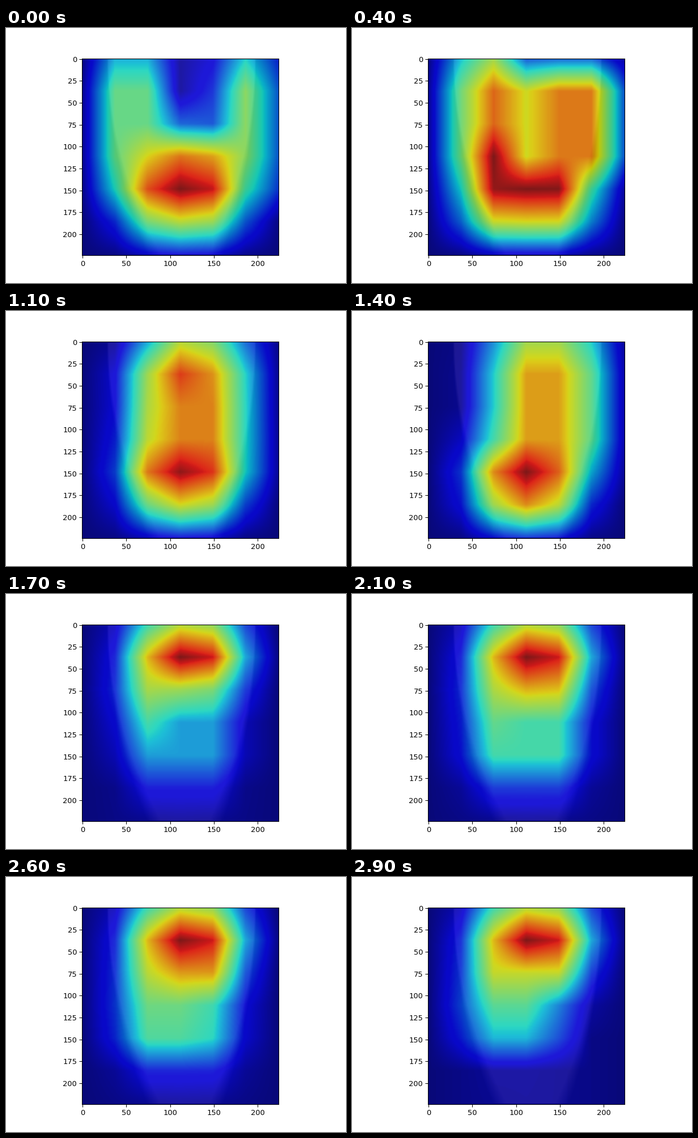
A matplotlib script that plays this animation: 600 px wide and 450 px high, repeating every 3 s.

```python
import numpy as np
import matplotlib.pyplot as plt
from matplotlib.animation import FuncAnimation

SIZE = 224
NODES = 7
FRAMES = 30
INTERVAL = 100

ROW, COL = np.mgrid[:NODES, :NODES]
HAZE = 0.02 + 0.03 * np.sin(np.pi * COL / (NODES - 1))


def blob(cols, rows, peak, reach):
    """Flat patch over a span of mesh columns and rows, with a soft rim."""
    dx = COL - np.clip(COL, *cols)
    dy = ROW - np.clip(ROW, *rows)
    return peak * np.exp(-(dx**2 + dy**2) / reach**2)


def pose(*blobs):
    return np.maximum.reduce([HAZE, *blobs])


UPPER_SPOT = blob((2.8, 3.6), (0.95, 1), 1, 1.3)

# Activation on the coarse mesh at its key frames.
POSES = {
    0: pose(blob((1, 2), (0.4, 3.7), 0.47, 0.65),
            blob((4.7, 5.4), (0.4, 3.7), 0.53, 0.65),
            blob((2.6, 3.6), (3.7, 4), 1, 1.4)),
    4: pose(blob((1.7, 2), (0.6, 3.2), 0.8, 1),
            blob((2, 2), (3, 3.5), 1, 0.7),
            blob((2.2, 3.9), (4, 4.2), 1, 1.2),
            blob((3.4, 5), (1, 3), 0.77, 0.9)),
    8: pose(blob((2, 4.15), (1.2, 4.1), 0.8, 0.85),
            blob((3, 3.3), (0.9, 1), 1, 1.3),
            blob((2.7, 3.8), (4, 4), 0.96, 1.3)),
    14: pose(blob((3, 4.2), (0.6, 3.3), 0.72, 1.2),
             blob((2.7, 3.4), (4, 4.3), 1, 1.3)),
    17: pose(UPPER_SPOT,
             blob((2, 2.3), (1.5, 2.5), 0.57, 0.9),
             blob((2, 4), (3, 4.2), 0.3, 0.9)),
    24: pose(UPPER_SPOT,
             blob((2.5, 4), (1.2, 2.2), 0.8, 0.9),
             blob((2, 4), (2, 4.1), 0.5, 0.95)),
    29: pose(UPPER_SPOT,
             blob((2, 4), (1.3, 2.1), 0.62, 0.9),
             blob((2, 3.2), (2.6, 3.4), 0.45, 1.1)),
}
KEYS = list(POSES)


def bilinear_weights():
    """Matrix that stretches the mesh nodes linearly over SIZE pixels."""
    nodes = np.linspace(0, SIZE - 1, NODES)
    pixels = np.arange(SIZE)
    return np.array([np.interp(pixels, nodes, row) for row in np.eye(NODES)]).T


def backdrop():
    """Soft pale body on a dark ground, under the heat map."""
    y, x = np.mgrid[:SIZE, :SIZE]
    left = 29 + 53 * (y / SIZE) ** 2
    right = 197 - 45 * (y / SIZE) ** 2
    soft = 2 + 14 * (y / SIZE) ** 2
    inside = (np.clip((x - left) / soft + 0.5, 0, 1)
              * np.clip((right - x) / soft + 0.5, 0, 1))
    return 0.035 + inside[..., None] * np.array([0.08, 0.06, 0.06])


STRETCH = bilinear_weights()
BACKDROP = backdrop()


def heat_image(frame):
    start = max(k for k in KEYS[:-1] if k <= frame)
    end = min(k for k in KEYS if k > start)
    mix = (frame - start) / (end - start)
    mesh = (1 - mix) * POSES[start] + mix * POSES[end]
    heat = STRETCH @ mesh @ STRETCH.T
    return np.clip(0.75 * plt.cm.jet(heat)[..., :3] + BACKDROP, 0, 1)


fig, ax = plt.subplots(figsize=(6.4, 4.8), dpi=93.75)
ax.set_facecolor("#0c0c82")
image = ax.imshow(heat_image(0))


def update(frame):
    image.set_data(heat_image(frame))
    return [image]


anim = FuncAnimation(fig, update, frames=FRAMES, interval=INTERVAL,
                     repeat=True, repeat_delay=0)
plt.show()
```
